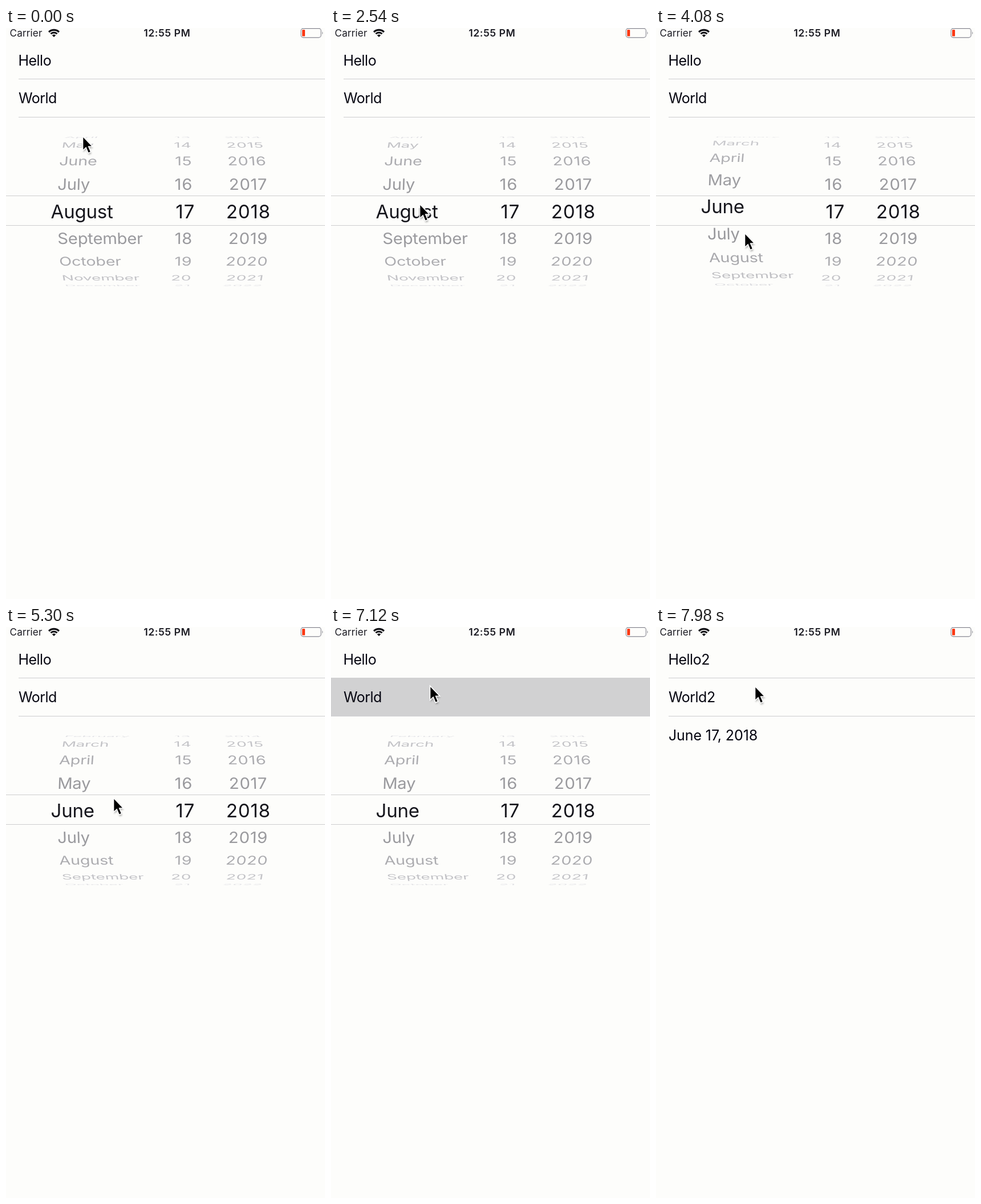
Write an HTML page that moves like this. It is 559 px wide and 1002 px high and loops after 8 s.

```html
<!DOCTYPE html>
<html lang="en">
<head>
<meta charset="utf-8">
<title>Inline date picker</title>
<style>
  html, body { margin: 0; width: 100%; height: 100%; overflow: hidden; background: #fdfdfb; }
  svg { display: block; width: 100vw; height: 100vh; font-family: Inter, Roboto, sans-serif; }
  .cell { font-size: 25px; letter-spacing: -.5px; fill: #050510; }
  .date { letter-spacing: -.1px; }
  .status { font-size: 17.2px; fill: #1c1c24; }
  .wheel { font-size: 29.4px; }
  .hair { stroke: #cdcdcf; stroke-width: 1; }
</style>
</head>
<body>
<svg viewBox="0 0 559 1002" preserveAspectRatio="none">
  <defs>
    <clipPath id="band"><rect y="295" width="559" height="51"/></clipPath>
    <clipPath id="rest"><path d="M0 187H559V294H0ZM0 347H559V454H0Z"/></clipPath>
    <filter id="soft" x="-50%" y="-50%" width="200%" height="200%"><feGaussianBlur stdDeviation="1.5"/></filter>
  </defs>
  <rect width="559" height="1002" fill="#fdfdfb"/>

  <g class="status">
    <text x="6.5" y="15" letter-spacing=".12">Carrier</text>
    <text x="282.3" y="15" text-anchor="middle" font-size="17.6" font-weight="600" letter-spacing=".55">12:55 PM</text>
  </g>
  <g fill="none" stroke="#0c0c12">
    <path d="M75.1 7.1A12.6 12.6 0 0 1 92.9 7.1" stroke-width="3.2"/>
    <path d="M78.4 10.3A8 8 0 0 1 89.6 10.3" stroke-width="2.8"/>
    <path d="M80.8 12.7A4.6 4.6 0 0 1 87.2 12.7L84 16Z" fill="#0c0c12" stroke="none"/>
  </g>
  <rect x="517" y=".8" width="35" height="16" rx="4" fill="none" stroke="#9c9ca4" stroke-width="1.4"/>
  <path d="M554 6Q556.6 8.8 554 11.6Z" fill="#9c9ca4"/>
  <rect x="519" y="3" width="5" height="11.6" rx="1.2" fill="#fb3a14"/>

  <path class="hair" d="M22 89.5H559M22 156.5H559"/>
  <rect id="tap" y="89" width="559" height="68" fill="#d1d1d2"/>
  <g id="before" class="cell">
    <text x="21.4" y="65.5">Hello</text>
    <text x="21.9" y="132">World</text>
  </g>
  <g id="after" class="cell">
    <text x="21.4" y="65.5">Hello2</text>
    <text x="21.9" y="132">World2</text>
    <text x="21.9" y="198.5" class="date">June 17, 2018</text>
  </g>
  <g id="picker">
    <path class="hair" d="M0 294.5H559M0 346.5H559"/>
    <g id="far" class="wheel" clip-path="url(#rest)"/>
    <g id="near" class="wheel" clip-path="url(#band)" fill="#15151c"/>
  </g>
  <g id="cursor">
    <path d="M0 0V25L5.6 19.8L9.6 29.5L14.2 27.5L10.2 18H17.2Z" transform="translate(1 3)" fill="#000" opacity=".3" filter="url(#soft)"/>
    <path d="M0 0V25L5.6 19.8L9.6 29.5L14.2 27.5L10.2 18H17.2Z" fill="#000" stroke="#fff" stroke-width="1.6"/>
  </g>
</svg>
<script>
const LOOP = 8000, CX = 279.5, CY = 321.5;
const RADIUS = 143, STEP = 19.5 * Math.PI / 180, DEPTH = 1465, ZOOM = 1.124;
const $ = id => document.getElementById(id);

const months = ['January', 'February', 'March', 'April', 'May', 'June', 'July',
  'August', 'September', 'October', 'November', 'December'];
const numbers = (from, n) => Array.from({ length: n }, (_, i) => String(from + i));

// x: resting anchor, zoomX: anchor inside the magnified band, mid: typical text centre
const columns = [
  { items: months, x: 89.2, zoomX: 78.6, mid: 145, anchor: 'start', gap: -.22 },
  { items: numbers(12, 11), x: 327.2, zoomX: 331, mid: 308, anchor: 'end', gap: .7 },
  { items: numbers(2013, 11), x: 425.3, zoomX: 424.7, mid: 425, anchor: 'middle', gap: .7 }
];

function addText(parent, label, { anchor, gap }) {
  const el = document.createElementNS('http://www.w3.org/2000/svg', 'text');
  el.textContent = label;
  el.setAttribute('y', 10.7);
  el.setAttribute('text-anchor', anchor);
  el.setAttribute('letter-spacing', gap);
  return parent.appendChild(el);
}

for (const c of columns) {
  c.rows = c.items.map(label => ({
    far: addText($('far'), label, c),
    near: addText($('near'), label, c)
  }));
}

function place(el, ...m) {
  el.setAttribute('transform', `matrix(${m.map(v => v.toFixed(4)).join(' ')})`);
}

// Rows sit on a cylinder seen in perspective
function turn(col, pos) {
  col.rows.forEach((row, i) => {
    const k = i - pos, a = k * STEP, shown = Math.abs(k) < 4.5;
    row.far.style.display = shown ? '' : 'none';
    row.near.style.display = Math.abs(k) < 1.5 ? '' : 'none';
    if (!shown) return;
    const sin = Math.sin(a), cos = Math.cos(a);
    const s = DEPTH / (DEPTH + RADIUS * (1 - cos));
    const ds = -s * s * sin / DEPTH;
    const y = RADIUS * sin * s;
    place(row.far, s, 0, (col.mid - CX) * ds, Math.max(.02, cos * s + RADIUS * sin * ds),
      CX + (col.x - CX) * s, CY + y);
    place(row.near, ZOOM, 0, 0, ZOOM * cos, col.zoomX, CY + y);
    const g = Math.round(146 + 78 * Math.pow(Math.min(1, Math.abs(k) / 4), 1.6));
    row.far.setAttribute('fill', `rgb(${g},${g},${g + 4})`);
  });
}

// Smooth blend through [time, ...values] stops
function track(stops, t) {
  let i = 0;
  while (i < stops.length - 2 && t > stops[i + 1][0]) i++;
  const [t0, ...a] = stops[i], [t1, ...b] = stops[i + 1];
  const p = Math.min(1, Math.max(0, (t - t0) / (t1 - t0)));
  const e = p * p * (3 - 2 * p);
  return a.map((v, n) => v + (b[n] - v) * e);
}

const pointer = [[0, 134.5, 190], [820, 180, 209], [1140, 183, 212], [1560, 182, 226],
  [2450, 155.5, 309], [2620, 155.5, 309], [3100, 155.5, 274], [3340, 155.5, 274],
  [3980, 155.5, 360], [4300, 155.5, 360], [5240, 188.5, 300], [5500, 188.5, 300],
  [6600, 173.5, 103], [7980, 173.5, 104]];
const scroll = [[3340, 7], [3980, 5.175], [4100, 5.175], [4480, 5]];
const leave = [[7540, 0], [7840, 1]];

turn(columns[1], 5);
turn(columns[2], 5);

function draw(t) {
  const [x, y] = track(pointer, t);
  const [gone] = track(leave, t);
  $('cursor').setAttribute('transform', `translate(${x.toFixed(2)} ${y.toFixed(2)})`);
  turn(columns[0], track(scroll, t)[0]);
  $('tap').setAttribute('opacity', t < 6860 ? 0 : 1 - gone);
  $('before').setAttribute('opacity', 1 - gone);
  $('picker').setAttribute('opacity', 1 - gone);
  $('after').setAttribute('opacity', gone);
}

const start = performance.now();
function tick() {
  draw((performance.now() - start) % LOOP);
  requestAnimationFrame(tick);
}
draw(0);
requestAnimationFrame(tick);
</script>
</body>
</html>
```
